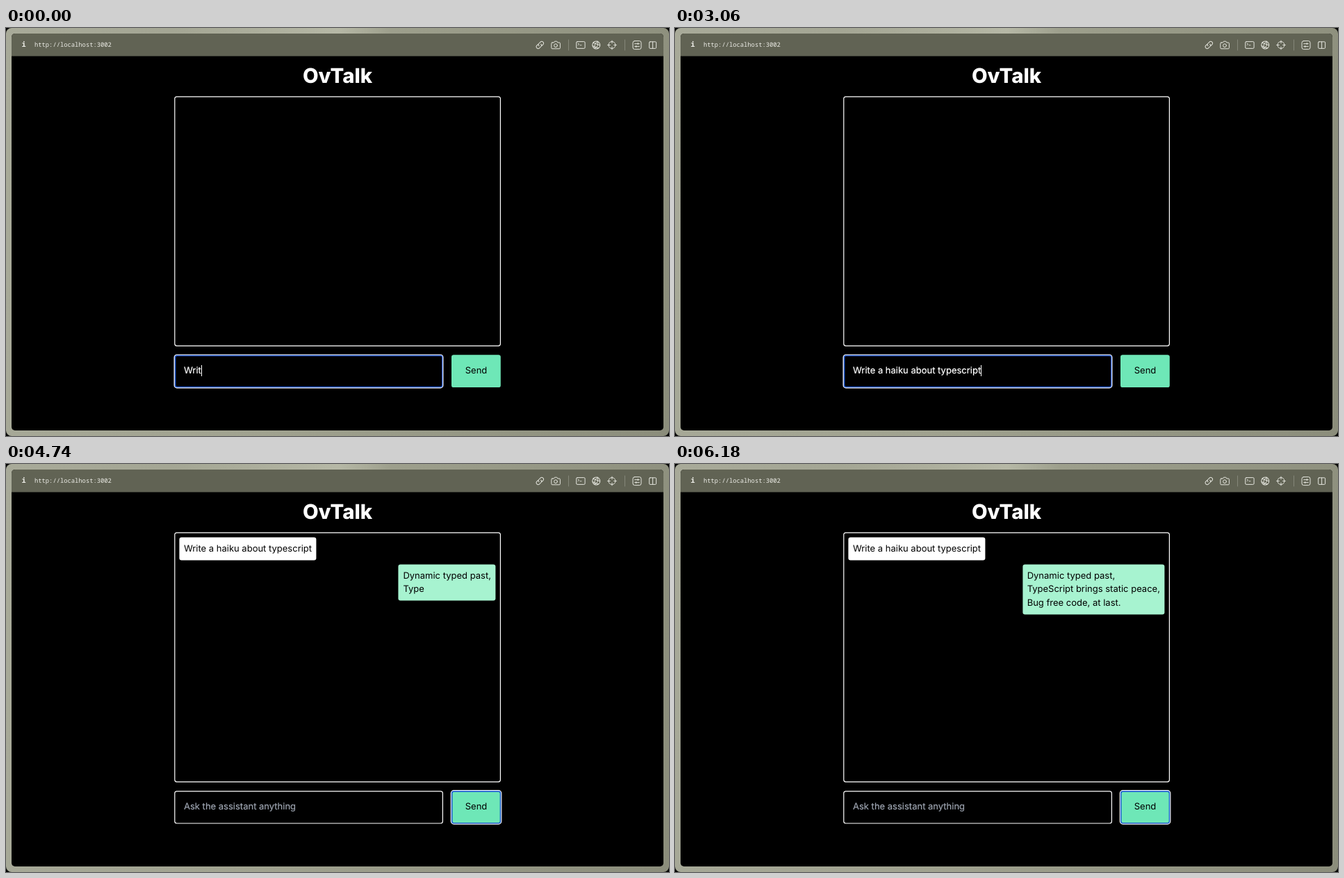
Animation, 954 px wide and 587 px high, one loop 6.69 s. Source, as an HTML page:

```html
<!DOCTYPE html>
<html lang="en">
<head>
<meta charset="utf-8">
<title>Chat demo</title>
<style>
  html, body { margin: 0; width: 100%; height: 100%; overflow: hidden; background: #000; }
  #stage {
    position: absolute; left: 0; top: 0; width: 954px; height: 587px; overflow: hidden;
    font: 13px/19.5px Inter, sans-serif; font-optical-sizing: none; color: #000;
    text-rendering: geometricPrecision; -webkit-font-smoothing: antialiased;
  }
  #stage > * { position: absolute; }
  svg { left: 0; top: 0; }
  .window {
    inset: 0; border-radius: 8px;
    background:
      linear-gradient(90deg, #a9ab9900 0 25%, #b6b8a6 50%, #8f918000 58%) 0 0 / 100% 8px no-repeat,
      linear-gradient(100deg, #a8aa99, #a0a28f 45%, #8b8d7b);
  }
  .page { left: 8px; top: 8px; width: 938px; height: 571px; border-radius: 5px; background: #000; overflow: hidden; }
  .bar { height: 32px; background: #616354; border-bottom: 1px solid #30312a; }
  .mono { font: 8.8px/12px "Noto Sans Mono", "DejaVu Sans Mono", monospace; color: #eeeee8; white-space: pre; }
  h1 { margin: 0; left: 0; width: 954px; top: 51.5px; font-size: 29.25px; line-height: 36px; font-weight: 800; text-align: center; color: #fff; }
  .bubble { top: 0; padding: 6.5px; border-radius: 3.25px; white-space: pre; }
  /* transforms keep the fractional edges */
  #question { left: 0; background: #fff; transform: translate(249.4px, 105.6px); }
  #reply { right: 0; background: #a7f3d0; transform: translate(-249.6px, 144.6px); }
  #field { left: 256px; top: 484px; color: #fff; white-space: pre; -webkit-text-stroke: .2px; }
  #field.empty { color: #9ca3af; }
  #field.focus::after {
    content: ""; display: inline-block; width: 1px; height: 15.5px; vertical-align: -3.5px; background: #fff;
  }
  #send { left: 641px; width: 71px; top: 484px; text-align: center; }
</style>
</head>
<body>
<div id="stage">
  <div class="window"></div>
  <div class="page"><div class="bar"></div></div>
  <div class="mono" style="left:22.5px;top:18px;font-size:10.5px;font-weight:700">i</div>
  <div class="mono" style="left:41px;top:18px">http://localhost:3002</div>

  <svg width="954" height="587" fill="none">
    <!-- toolbar icons -->
    <g stroke="#e3e4dc" stroke-linecap="round" stroke-linejoin="round">
      <g transform="translate(768.3 24.5) rotate(-45)">
        <path d="M-1 -2.6H-3.6a2.6 2.6 0 0 0 0 5.2H-.6a2.6 2.6 0 0 0 2.5 -2.6M1 2.6H3.6a2.6 2.6 0 0 0 0 -5.2H.6a2.6 2.6 0 0 0 -2.5 2.6"/>
      </g>
      <path d="M786 21h2.3l1.2-1.8h3.2l1.2 1.8h2.3a1.2 1.2 0 0 1 1.2 1.2v6.4a1.2 1.2 0 0 1-1.2 1.2H786a1.2 1.2 0 0 1-1.2-1.2v-6.4a1.2 1.2 0 0 1 1.2-1.2z"/>
      <circle cx="791" cy="25.2" r="2.4"/>
      <rect x="820.7" y="19.6" width="12.4" height="9.8" rx="1.4"/>
      <path d="M823 22l1.6 1.3-1.6 1.3M826 24.7h2" stroke-width=".9"/>
      <g transform="rotate(20 849.3 24.5)">
        <circle cx="849.3" cy="24.5" r="5.5"/>
        <path d="M844 23h10.6M845 27.5h8.6M849.3 19q-4.4 5.5 0 11M849.3 19q4.4 5.5 0 11" stroke-width=".9"/>
      </g>
      <circle cx="872" cy="24.5" r="5"/>
      <path d="M872 18.2v3.6M872 27.2v3.6M865.7 24.5h3.6M874.7 24.5h3.6"/>
      <rect x="902" y="18.6" width="12" height="12" rx="2.6"/>
      <path d="M904.7 22.6h6.6M904.7 26.6h6.6M909.3 21.6v2M906.7 25.6v2"/>
      <rect x="925.6" y="19.8" width="10" height="9.6" rx="1.2"/>
      <path d="M930.6 20v9.2"/>
      <path d="M809.5 17v15M890.5 17v15" stroke="#85877a"/>
    </g>

    <g stroke="#fff" stroke-width="1.2">
      <rect x="242.8" y="98.8" width="468.6" height="358.5" rx="3"/>
      <rect x="242.8" y="470.8" width="385.6" height="46.2" rx="3"/>
    </g>
    <rect x="641" y="470.3" width="70.8" height="46.8" rx="3.2" fill="#6ee7b7"/>
    <g id="fieldRing">
      <rect x="243.5" y="471.4" width="384.4" height="45.2" rx="2.6" stroke="#1d55c9" stroke-width="1.8"/>
      <rect x="242.1" y="470" width="386.8" height="47.8" rx="3.8" stroke="#eef2ff" stroke-width="1.2"/>
    </g>
    <g id="sendRing">
      <rect x="641.6" y="471" width="70" height="45.8" rx="2.8" stroke="#1d5fd0" stroke-width="1.8"/>
      <rect x="640.3" y="469.7" width="72.5" height="48.4" rx="4" stroke="#f4f7ff" stroke-width="1.2"/>
    </g>
  </svg>

  <h1>OvTalk</h1>
  <div id="question" class="bubble">Write a haiku about typescript</div>
  <div id="reply" class="bubble"></div>
  <div id="field"></div>
  <div id="send">Send</div>

  <svg width="954" height="587" fill="none">
    <defs>
      <path id="beamLine" d="M-3 -6Q0 -6.4 0 -4V4Q0 6.4 -3 6M3 -6Q0 -6.4 0 -4M0 4Q0 6.4 3 6M-1.5 2H1.5"/>
    </defs>
    <g id="beam">
      <use href="#beamLine" stroke="#fff" stroke-width="2.4" stroke-linecap="round"/>
      <use href="#beamLine" stroke="#111" stroke-width=".8"/>
    </g>
    <path id="arrow" d="M0 0V12.2L2.8 9.6 4.7 13.9 6.7 13 4.9 8.8H8.8Z" fill="#000" stroke="#fff" stroke-width="1" stroke-linejoin="round"/>
  </svg>
</div>

<script>
const LOOP = 6690, BLUR = 3300, SENT = 3870;
const PROMPT = "Write a haiku about typescript";
const FIRST_CHARS = 4;

// when each further character of the prompt is typed
const KEYS = [
  30, 120, 210, 330, 540, 630, 750, 900, 1020, 1170, 1320, 1470,
  1650, 1710, 1770, 1860, 2070, 2190, 2250, 2310, 2460,
  2700, 2790, 2880, 2970, 3060
];

// streamed pieces of the answer
const TOKENS = [
  [4410, "Dynamic"], [4500, " typed"], [4620, " past"], [4650, ",\n"],
  [4710, "Type"], [4770, "Script"], [4830, " brings"], [4890, " static"],
  [4950, " peace"], [4980, ",\n"], [5070, "Bug"], [5130, " free"],
  [5190, " code"], [5250, ","], [5280, " at"], [5340, " last"], [5400, "."]
];

// pointer visits: points of time, x, y; each visit ends at its last time
const VISITS = [
  [[4440, 352, 568], [4530, 346, 480.5], [4740, 346, 480.5]],
  [[5010, 345, 480], [5550, 345, 480], [5670, 430, 365], [5730, 523, 262],
   [5790, 640, 230], [5850, 727, 210], [5910, 741, 167], [6090, 741, 167],
   [6150, 672, 83], [6180, 672, 83]]
];

const $ = id => document.getElementById(id);
const show = (id, on) => { $(id).style.visibility = on ? "visible" : "hidden"; };
const setText = (id, text) => { if ($(id).textContent !== text) $(id).textContent = text; };

function pointerAt(t) {
  const path = VISITS.find(p => t >= p[0][0] && t < p[p.length - 1][0]);
  if (!path) return null;
  const i = path.findIndex(p => p[0] > t);
  const [t0, x0, y0] = path[i - 1], [t1, x1, y1] = path[i];
  const k = (t - t0) / (t1 - t0);
  return [x0 + (x1 - x0) * k, y0 + (y1 - y0) * k];
}

function drawPointer(t) {
  const pos = pointerAt(t);
  const overField = pos && pos[1] > 470 && pos[1] < 518;
  show("beam", pos && overField);
  show("arrow", pos && !overField);
  if (pos) $(overField ? "beam" : "arrow").setAttribute("transform", `translate(${pos})`);
}

function draw(t) {
  const focused = t < BLUR, sent = t >= SENT;
  const typed = FIRST_CHARS + KEYS.filter(k => k <= t).length;
  setText("field", sent ? "Ask the assistant anything" : PROMPT.slice(0, typed));
  $("field").className = focused ? "focus" : sent ? "empty" : "";
  show("fieldRing", focused);
  show("sendRing", !focused);
  show("question", sent);

  const answer = TOKENS.filter(([at]) => at <= t).map(([, s]) => s).join("");
  setText("reply", answer);
  show("reply", answer);
  drawPointer(Math.floor(t / 30) * 30);
}

const start = performance.now();
function tick() {
  draw((performance.now() - start) % LOOP);
  requestAnimationFrame(tick);
}
tick();
</script>
</body>
</html>
```
